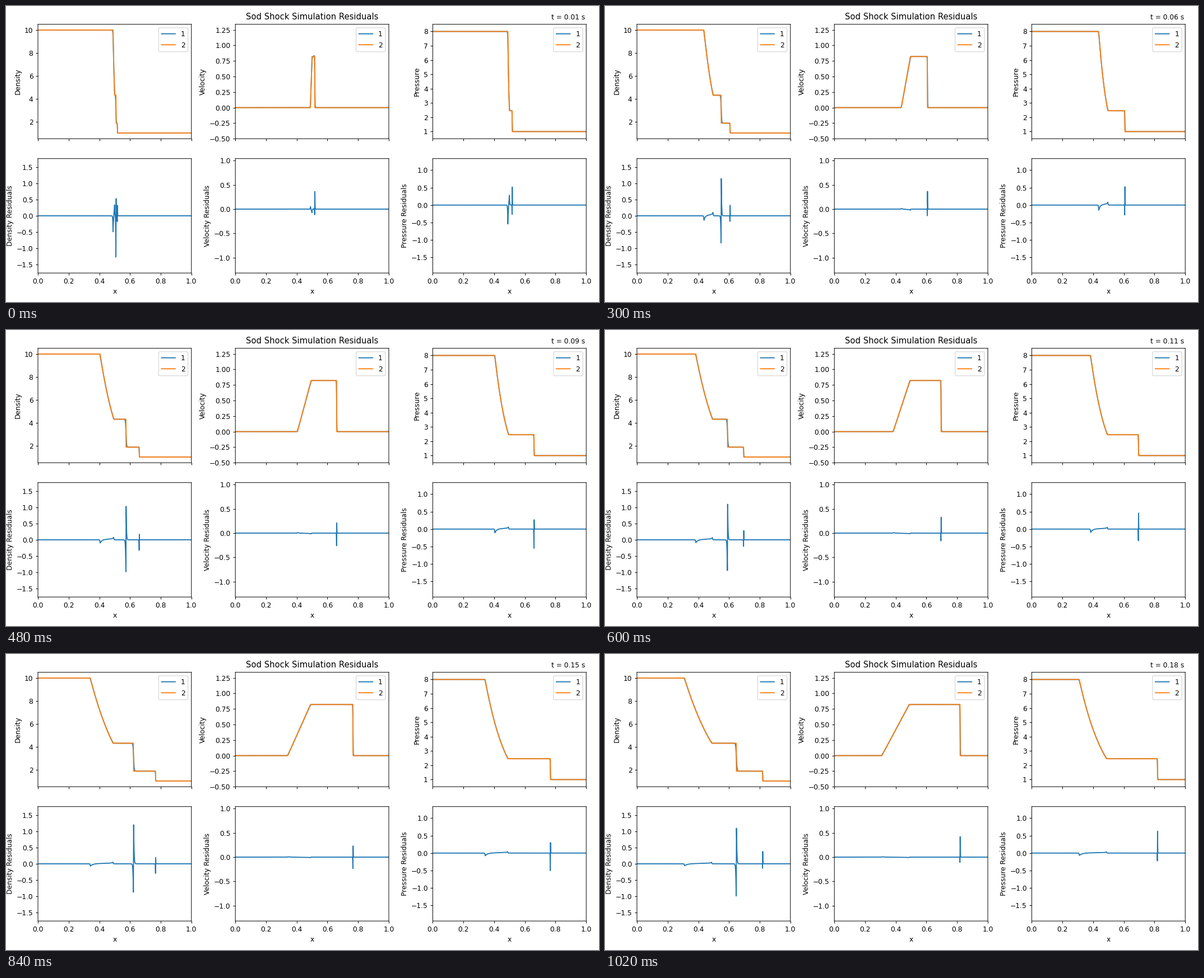
A matplotlib script that plays this animation: 1058x529 px, repeating every 1080 ms.

```python
import matplotlib.pyplot as plt
import numpy as np
from matplotlib.animation import FuncAnimation

W, H = 1058, 529
FRAMES, INTERVAL = 18, 60
plt.rcParams.update({
    "font.family": "DejaVu Sans",
    "font.size": 10,
    "path.snap": False,
    "legend.labelspacing": 0.54,
    "legend.borderpad": 0.42,
})

# Shock tube: left state (rho 10, p 8), right state (1, 1), gamma 1.4
N = 800
x = np.linspace(0, 1, N)
C_LEFT = np.sqrt(1.4 * 8 / 10)
U_STAR, P_STAR, SHOCK_SPEED = 0.82116, 2.45706, 1.77439
RHO_LEFT, RHO_RIGHT = 4.3033, 1.8615
TAIL_SPEED = 1.2 * U_STAR - C_LEFT

# Per variable: jump at the shock, steepness and centre (in cells) of the smeared
# shock, then (amplitude, decay power) of the error at the fan's head and tail.
ERRORS = [
    (RHO_RIGHT - 1, 1.90, 0.191, (-0.52, 0.73), (0.39, 0.74)),
    (U_STAR, 1.85, 0.341, (0.055, 0.75), (-0.08, 0.73)),
    (P_STAR - 1, 2.00, 0.171, (-0.57, 0.73), (0.33, 0.78)),
]


def exact(t):
    speed = (x - 0.5) / t
    u = np.clip((C_LEFT + speed) / 1.2, 0, U_STAR)
    sound = 1 - 0.2 * u / C_LEFT
    rho, p = 10 * sound**5, 8 * sound**7
    rho[speed > U_STAR] = RHO_RIGHT
    ahead = speed > SHOCK_SPEED
    rho[ahead], u[ahead], p[ahead] = 1, 0, 1
    return [rho, u, p]


def smeared_step(cells, steepness, centre):
    """Error of a logistic front against a sharp step at zero."""
    arg = np.clip(steepness * (cells - centre), -60, 60)
    return 1 / (1 + np.exp(arg)) - (cells <= 0)


def fan_error(s, k, head, tail):
    """Error across the rarefaction fan, s running from 0 (head) to 1 (tail)."""
    head_amp = head[0] * k ** -head[1]
    tail_amp = tail[0] * k ** -tail[1]
    inside = np.clip(s, 0, 1)
    edge = 8 * k / 1.2
    before = np.exp(np.minimum(s, 0) * edge)
    after = np.exp(-np.maximum(s - 1, 0) * edge)
    head_part = head_amp * np.exp(-inside / (0.09 + 0.25 / k)) * before
    ramp = 0.45 * inside + 0.55 * np.exp((inside - 1) / (0.03 + 0.3 / k))
    return (head_part + tail_amp * ramp * before) * after


def residuals(k):
    t = 0.01 * k
    speed = (x - 0.5) / t
    fan = (speed + C_LEFT) / (TAIL_SPEED + C_LEFT)
    shock_cells = (speed - SHOCK_SPEED) * t * (N - 1)
    contact_cells = (speed - U_STAR) * t * (N - 1)
    result = []
    for jump, steepness, centre, head, tail in ERRORS:
        shock = smeared_step(shock_cells, steepness, centre - 0.15 / k)
        result.append(jump * shock + fan_error(fan, k, head, tail))
    contact = smeared_step(contact_cells, 1.2 * k**-0.25, -0.13 + 0.062 * np.log(k))
    result[0] += (RHO_LEFT - RHO_RIGHT) * contact
    # start-up overshoot growing towards the young shock
    rise = (speed - U_STAR) / (SHOCK_SPEED - U_STAR)
    overshoot = np.where((rise > 0) & (rise < 1), rise, 0) * 0.025 * np.exp(1 - k)
    result[1] += overshoot
    result[2] += overshoot
    return result


fig = plt.figure(figsize=(12, 6), dpi=H / 6, facecolor="white")


def make_axes(col, bottom, name, ylim):
    ax = fig.add_axes([(57 + 352.2 * col) / W, bottom / H, 273.8 / W, 204.5 / H])
    ax.set(xlim=(0, 1), ylim=ylim, ylabel=name)
    return ax


NAMES = ["Density", "Velocity", "Pressure"]
STATE_LIMITS = [(0.5, 10.5), (-0.5, 1.339), (0.5, 8.5)]
RESIDUAL_LIMITS = [(-1.768, 1.768), (-1.315, 1.04), (-1.945, 1.33)]

numeric_lines, exact_lines, residual_lines = [], [], []
for col, name in enumerate(NAMES):
    top = make_axes(col, 291.8, name, STATE_LIMITS[col])
    top.tick_params(labelbottom=False)
    numeric_lines += top.plot(x, 0 * x, label="1")
    exact_lines += top.plot(x, 0 * x, label="2")
    top.legend(loc="upper right")
    if col == 1:
        top.set_title("Sod Shock Simulation Residuals", pad=7)
    low = make_axes(col, 51.8, name + " Residuals", RESIDUAL_LIMITS[col])
    low.set_xlabel("x")
    residual_lines += low.plot(x, 0 * x)

clock = fig.text(1033 / W, (H - 24) / H, "", ha="right", va="baseline")


def update(frame):
    k = frame + 1
    states, errors = exact(0.01 * k), residuals(k)
    for i in range(3):
        numeric_lines[i].set_ydata(states[i] + errors[i])
        exact_lines[i].set_ydata(states[i])
        residual_lines[i].set_ydata(errors[i])
    clock.set_text(f"t = {0.01 * k:.2f} s")
    return numeric_lines + exact_lines + residual_lines + [clock]


anim = FuncAnimation(fig, update, frames=FRAMES, interval=INTERVAL, repeat=True)
plt.show()
```
